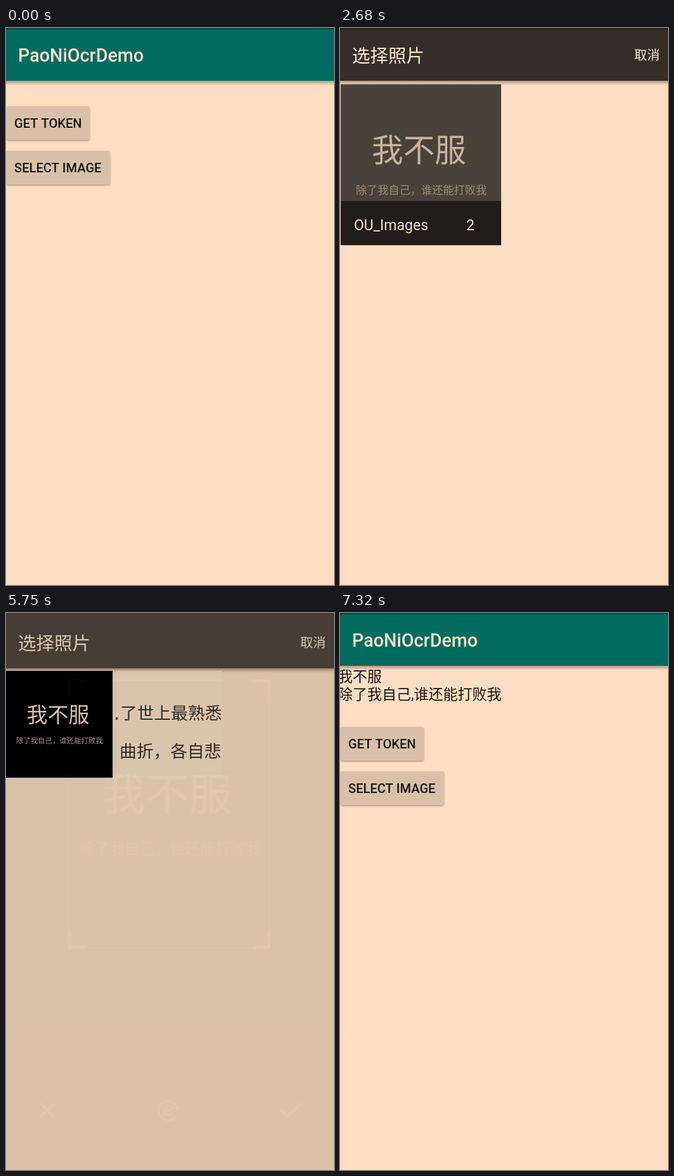
Recreate the animation shown at these times as an HTML page with a canvas. Size 517x876 px, loop 7860 ms.

```html
<!DOCTYPE html>
<html lang="zh">
<head>
<meta charset="utf-8">
<style>
html, body { margin: 0; width: 100%; height: 100%; overflow: hidden; background: #fcdfc3; }
canvas { display: block; }
</style>
</head>
<body>
<canvas id="stage" width="517" height="876"></canvas>
<script>
const W = 517, H = 876, LOOP = 7860, SLIDE = H * 0.08, BLEED = 80;
const PEACH = '#fcdfc3', CREAM = '#fce6cf';
const LATIN = 'Roboto, "Noto Sans CJK SC", sans-serif';
const HAN = '"Noto Sans CJK SC", "Noto Sans CJK", sans-serif';
const APP = 'PaoNiOcrDemo', FOLDER = 'OU_Images';

const stage = document.getElementById('stage').getContext('2d');
const buffer = document.createElement('canvas');
buffer.width = W;
buffer.height = H + BLEED;
const layerCtx = buffer.getContext('2d');
layerCtx.translate(0, BLEED);
let c = stage;

const clamp = v => Math.max(0, Math.min(1, v));
const progress = (t, start, length) => clamp((t - start) / length);

function box(x, y, w, h, color) {
  c.fillStyle = color;
  c.fillRect(x, y, w, h);
}

function text(str, x, y, size, color, weight = 400, family = LATIN, align = 'left') {
  c.font = `${weight} ${size}px ${family}`;
  c.textAlign = align;
  c.fillStyle = color;
  c.fillText(str, x, y);
}

function line(d, width = 2.2, color = CREAM) {
  c.strokeStyle = color;
  c.lineWidth = width;
  c.lineCap = c.lineJoin = 'round';
  c.stroke(new Path2D(d));
}

function disc(x, y, r, color) {
  c.fillStyle = color;
  c.beginPath();
  c.arc(x, y, r, 0, Math.PI * 2);
  c.fill();
}

// Composites a whole screen with one opacity and a vertical shift.
function layer(draw, alpha, dy = 0) {
  if (alpha <= 0) return;
  c = layerCtx;
  c.clearRect(0, -BLEED, W, H + BLEED);
  draw();
  c = stage;
  c.globalAlpha = alpha;
  c.drawImage(buffer, 0, Math.round(dy) - BLEED);
  c.globalAlpha = 1;
}

function openScreen(draw, t, start) {
  if (t < start) return;
  layer(draw, 1 - (1 - progress(t, start, 200)) ** 4,
    SLIDE * (1 - progress(t, start, 350)) ** 5);
}

function closeScreen(draw, t, start) {
  layer(draw, 1 - progress(t, start + 100, 170), SLIDE * progress(t, start, 250) ** 4);
}

function toolbar(color) {
  const shade = c.createLinearGradient(0, 83, 0, 90);
  shade.addColorStop(0, 'rgba(60,45,30,.4)');
  shade.addColorStop(1, 'rgba(60,45,30,0)');
  box(0, 83, W, 7, shade);
  box(0, -BLEED, W, 83 + BLEED, color);
}

const statusLine = () => box(0, 0, W, 1.5, 'rgba(0,0,0,.45)');

// Dark background with a lighter strip for the controls.
function backdrop(foot) {
  const sky = c.createLinearGradient(0, 0, 0, 667);
  sky.addColorStop(0, '#020303');
  sky.addColorStop(0.3, '#0e0e0e');
  sky.addColorStop(1, foot);
  box(0, -BLEED, W, H + BLEED, sky);
  box(0, 666, W, H - 666, '#1a1a1a');
}

function button(label, y, w, ripple = 0) {
  c.save();
  c.shadowColor = 'rgba(70,50,30,.45)';
  c.shadowBlur = 3;
  c.shadowOffsetY = 1.5;
  c.fillStyle = '#d9c0a9';
  c.beginPath();
  c.roundRect(1, y, w, 53, 3);
  c.fill();
  c.restore();
  if (ripple > 0 && ripple < 1) {
    c.save();
    c.clip();
    disc(1 + w / 2, y + 26, 20 + 90 * clamp(ripple * 2), `rgba(60,40,20,${0.14 * (1 - ripple)})`);
    c.restore();
  }
  text(label, 13, y + 34, 20.1, '#1b1611', 500);
}

function home(t) {
  const done = t >= 7320, y = done ? 179 : 123;
  box(0, 0, W, H, PEACH);
  toolbar('#006b5e');
  statusLine();
  text(APP, 19, 53, 28.7, CREAM, 500);
  if (done) {
    text('我不服', -3, 108, 23, '#1b1611');
    text('除了我自己,谁还能打败我', -3, 136, 23, '#1b1611');
  }
  button('GET TOKEN', y, 131);
  button('SELECT IMAGE', y + 70, 163, progress(t, 860, 720));
}

function camera() {
  backdrop('#212120');

  c.strokeStyle = CREAM;
  c.lineWidth = 2;
  c.beginPath();
  c.roundRect(51, 771, 29, 25, 4);
  c.stroke();
  disc(59, 780, 2.5, CREAM);
  line('M55 791 C58 786 60 784 63 787 S67 791 69 786 S73 778 77 779', 2);

  disc(257, 783.5, 42.4, CREAM);
  disc(257, 783.5, 37.6, '#1a1714');
  disc(257, 783.5, 35.6, '#ecd7c3');

  line('M444 793 C444 788 439 787 439 781 A10.5 10.5 0 0 1 460 781 C460 787 454 788 454 793');
  line('M444 796 L454 794 M444 800 L455 798 M447 804 L452 803');
}

// Black square picture with its two captions.
function poster(x, y, s) {
  box(x, y, s, s, '#000');
  text('我不服', x + s * 0.488, y + s * 0.482, s * 0.196, '#fbe2ca', 400, HAN, 'center');
  text('除了我自己，谁还能打败我', x + s * 0.502, y + s * 0.681, s * 0.068, '#c3a991', 300, HAN, 'center');
}

function picker(t) {
  const leaving = t >= 5740;
  box(0, 0, W, H, PEACH);
  toolbar(leaving ? '#52473d' : '#352e28');
  if (!leaving) statusLine();
  text('选择照片', 19, 54, 28.5, CREAM, 400, HAN);
  text('取消', 504, 50, 20.1, CREAM, 400, HAN, 'right');

  if (t < 3590) {
    const fade = progress(t, 2500, 257);
    if (!fade) return;
    c.globalAlpha = fade;
    poster(1, 88.5, 253);
    c.globalAlpha = 1;
    box(1, 272, 253, 69.5, 'rgba(0,0,0,.55)');
    text(FOLDER, 22, 318, 23, CREAM);
    text('2', 199, 318, 23, CREAM);
    return;
  }
  c.globalAlpha = progress(t, 3890, 300);
  poster(0, 87, 168);
  box(173, 87, 168, 168, '#fde3c8');
  box(173, 160, 3, 4, '#4a4037');
  text('了世上最熟悉', 180, 163, 26.7, '#3a322b', 300, HAN);
  text('曲折，各自悲', 179, 223, 26.7, '#3a322b', 300, HAN);
  c.globalAlpha = 1;
}

function crop() {
  backdrop('#121110');
  box(0, 141, W, 350, '#000');
  poster(83, 141, 350);

  c.strokeStyle = CREAM;
  c.lineWidth = 1;
  c.strokeRect(99.5, 105.5, 316, 421);
  for (const [x, y, sx, sy] of [[98, 104, 1, 1], [417, 104, -1, 1], [98, 528, 1, -1], [417, 528, -1, -1]]) {
    box(x, y, 27 * sx, 4.5 * sy, PEACH);
    box(x, y, 4.5 * sx, 28 * sy, PEACH);
  }

  line('M55 772 L75 792 M75 772 L55 792', 3.2);
  line('M433 782 L443 792 L465 772', 3.6);
  line('M267 793 A15 15 0 1 1 270 778', 2.2);
  line('M267 778 L274 778 L270.5 783 Z', 1.6);
  line('M249 775 H263 V789 H249 Z M251 786 L255 781 L257 784 L261 779', 1.7);
  disc(253, 779, 1.3, CREAM);
}

// Dark traces of the home labels while the camera opens.
function traces() {
  const ink = 'rgba(0,0,0,.3)';
  text(APP, 19, 53, 28.7, ink, 500);
  text('GET TOKEN', 13, 157, 20.1, ink, 500);
  text('SELECT IMAGE', 13, 227, 20.1, ink, 500);
}

function render(t) {
  if (t < 2730) {
    home(t);
    openScreen(camera, t, 1905);
    if (t > 2000 && t < 2130) traces();
    openScreen(() => picker(t), t, 2380);
  } else if (t < 5628) {
    picker(t);
  } else if (t < 6805) {
    box(0, 0, W, H, '#000');
    layer(crop, progress(t, 5720, 180));
    closeScreen(() => picker(t), t, 5628);
  } else {
    home(t);
    closeScreen(crop, t, 6805);
  }
}

function tick() {
  render(performance.now() % LOOP);
  requestAnimationFrame(tick);
}
tick();
</script>
</body>
</html>
```
